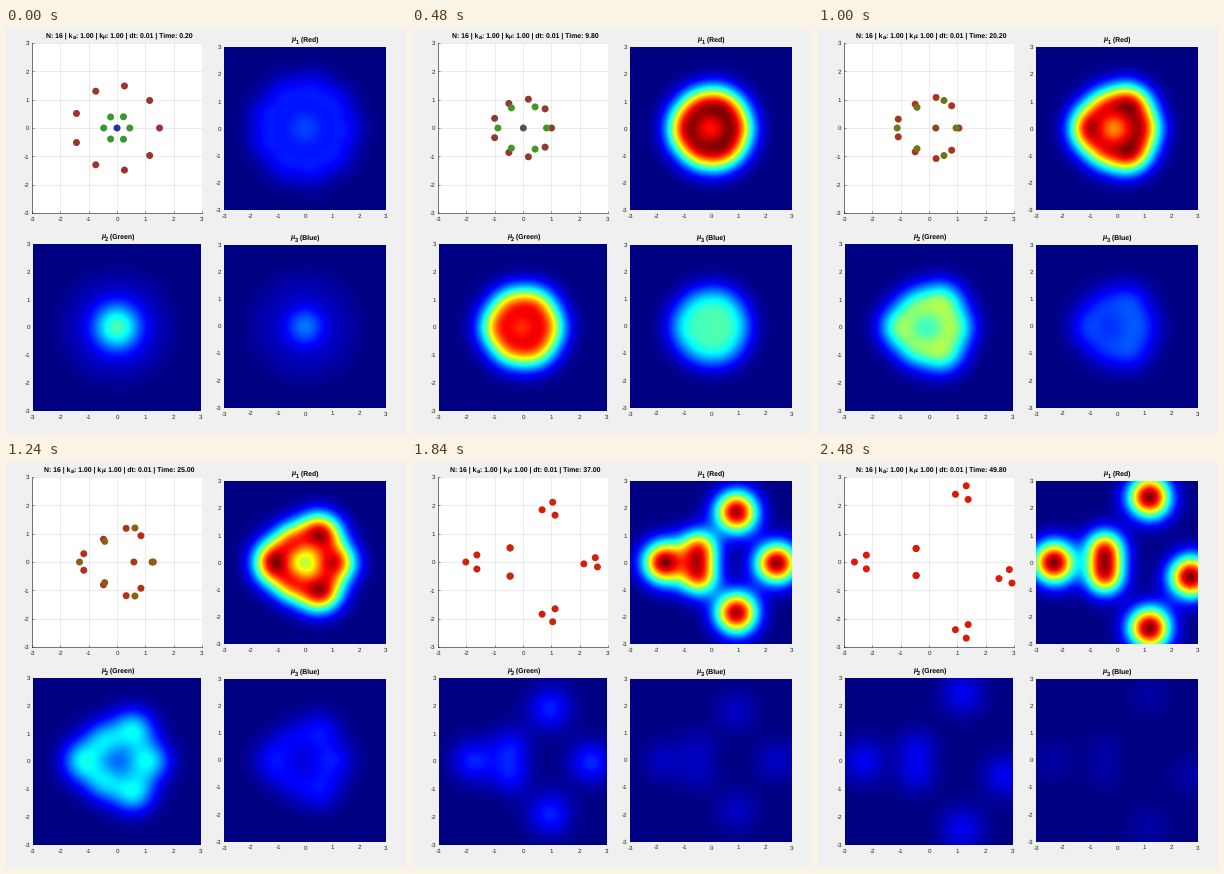
Write a matplotlib script that moves like this. It is 400 px wide and 406 px high and loops after 2.52 s.

```python
import numpy as np
import matplotlib.pyplot as plt
from matplotlib.animation import FuncAnimation
from matplotlib.colors import ListedColormap

W, H, DPI = 400, 406, 64
PT = 72 / DPI                      # points per pixel
FRAMES, INTERVAL = 63, 40
INK = (0.15, 0.15, 0.15)

plt.rcParams.update({"font.family": "Liberation Sans",
                     "text.hinting": "none"})


# --- easing --------------------------------------------------------------
def logistic(i, mid, rate):
    return 1 / (1 + np.exp(-rate * (i - mid)))


def smooth(i, start, end):
    u = np.clip((i - start) / (end - start), 0, 1)
    return u * u * (3 - 2 * u)


def settle(i, start, end):
    """Fast decay from the starting value to the resting one."""
    return end + (start - end) * np.exp(-0.9 * i)


def around(radius, degrees):
    a = np.radians(degrees)
    return np.column_stack([radius * np.cos(a), radius * np.sin(a)])


# --- particles -----------------------------------------------------------
# 0-8: outer ring, 9-14: inner ring, 15: centre
GROUP = np.repeat([0, 1, 2], [9, 6, 1])
LEFT, RIGHT = [9 + 3, 5, 4], [9, 0, 15]
TOP, BOTTOM = [10, 1, 2], [14, 8, 7]

# members, turn, radius, drift, drift midpoint, drift rate, sideways opening
CLUSTERS = [
    (LEFT, (180, -60, 60), 0.28, (-1.8, 0), 47, 0.095, 10),
    (TOP, (68, -52, 188), 0.28, (0.82, 1.78), 42.5, 0.13, 10),
    (BOTTOM, (-68, 52, -188), 0.28, (0.82, -1.78), 42.5, 0.13, 10),
    (RIGHT, (-49, 71, 191), 0.28, (2.15, 0), 37.6, 0.21, 36),
    ([11, 3], (0, 0), 0, (0, -0.31), 38.3, 0.35, 10),
    ([13, 6], (0, 0), 0, (0, 0.31), 38.3, 0.35, 10),
]

# (green, blue) shares of outer, inner, centre; red is the rest
START = np.array([(.20, .18), (.60, .18), (.20, .65)])
REST = np.array([(.22, .27), (.60, .18), (.31, .40)])


def positions(i):
    """Two rings break up into clusters that drift apart."""
    pos = np.concatenate([
        around(settle(i, 1.5, 1.0), np.arange(9) * 40),
        around(settle(i, 0.45, 0.82), np.arange(6) * 60),
        np.zeros((1, 2))])
    for members, turn, radius, drift, mid, rate, opening in CLUSTERS:
        middle = pos[members].mean(axis=0)
        offset = pos[members] - middle
        blend = np.array([smooth(i, 10, 52), smooth(i, opening, 52)])
        offset += (around(radius, turn) - offset) * blend
        pos[members] = middle + offset + np.array(drift) * logistic(i, mid, rate)
    pos[RIGHT, 1] -= 0.62 * logistic(i, 56, 0.3)
    return pos


def shares(i):
    """Neighbours mix, then green and blue fade in favour of red."""
    gb = settle(i, START, REST)[GROUP]
    gb += (gb.mean(axis=0) - gb) * smooth(i, 10, 65)
    green = gb[:, 0] * (1 - 0.75 * logistic(i, 34, 0.15))
    blue = gb[:, 1] * np.exp(-0.037 * max(i - 5, 0))
    return np.column_stack([1 - green - blue, green, blue])


# --- concentration fields ------------------------------------------------
GRID = np.linspace(-3, 3, 151)


def fields(pos, mix, time):
    gx = np.exp(-2 * (GRID - pos[:, :1]) ** 2)
    gy = np.exp(-2 * (GRID - pos[:, 1:]) ** 2)
    maps = [(gy * mix[:, k:k + 1]).T @ gx for k in range(3)]
    gain = 1 - 0.55 * np.exp(-1.5 * (time - 0.2))
    top = max(f.max() for f in maps)
    return [f * gain / top for f in maps]


def jet(n=256):
    x = np.arange(1, n + 1) / n
    ramps = [np.clip(1.5 - np.abs(4 * x - c), 0, 1) for c in (3, 2, 1)]
    return ListedColormap(np.column_stack(ramps))


# --- stage ---------------------------------------------------------------
fig = plt.figure(figsize=(W / DPI, H / DPI), dpi=DPI,
                 facecolor=(240 / 255,) * 3)


def panel(x, y, w, h, lines=False):
    ax = fig.add_axes([x / W, 1 - (y + h) / H, w / W, h / H])
    ticks = range(-3, 4)
    ax.set(xlim=(-3, 3), ylim=(-3, 3))
    ax.set_xticks(ticks, [str(v) for v in ticks])
    ax.set_yticks(ticks, [str(v) for v in ticks])
    ax.tick_params(direction="in", length=1.7 * PT * lines, width=0.5 * PT,
                   color=INK, labelcolor=INK, labelsize=6.2 * PT)
    ax.tick_params(axis="x", pad=3.6 * PT)
    ax.tick_params(axis="y", pad=2.8 * PT)
    for side, spine in ax.spines.items():
        spine.set_visible(lines and side in ("left", "bottom"))
        spine.set(linewidth=0.6 * PT, color=INK)
    return ax


def heading(ax, x, y, parts):
    """Chain text parts along a baseline; a leading _ marks a subscript."""
    made = []
    for part in parts:
        sub = part.startswith("_")
        text = part.lstrip("_")
        style = dict(va="baseline", fontweight="bold",
                     fontsize=(5.6 if sub else 6.85) * PT)
        if text == "μ":
            style.update(family="Liberation Serif", style="italic",
                         fontsize=(6.4 if sub else 7.6) * PT)
        level = 1 - (y + 2.2 * sub) / H
        if made:
            made.append(ax.annotate(
                text, (1, level), xycoords=(made[-1], "figure fraction"),
                annotation_clip=False, **style))
        else:
            made.append(fig.text(x / W, level, text, **style))
    return made


plot = panel(26, 15, 170, 170, lines=True)
plot.set_axisbelow(True)
plot.grid(color=(0.87, 0.87, 0.87), linewidth=0.6 * PT)
dots = plot.scatter(np.zeros(16), np.zeros(16), s=(7 * PT) ** 2,
                    linewidths=0, zorder=3, clip_on=False)
head = heading(plot, 40, 9, ["N: 16 | k", "_a", ": 1.00 | k", "_μ",
                             ": 1.00 | dt: 0.01 | Time: 0.20"])

JET = jet()
images = []
for k, (name, box, left, base) in enumerate([
        ("Red", (218, 19, 162, 163), 285.5, 13.3),
        ("Green", (27, 215.5, 168, 167.5), 95, 210.3),
        ("Blue", (218, 216.5, 162, 163), 284.5, 211.3)]):
    ax = panel(*box)
    images.append(ax.imshow(np.zeros((151, 151)), cmap=JET, vmin=0, vmax=1,
                            origin="lower", extent=(-3, 3, -3, 3),
                            aspect="auto", interpolation="bilinear"))
    heading(ax, left, base, ["μ", f"_{k + 1}", f" ({name})"])


def update(i):
    time = 0.2 + 0.8 * i
    pos, mix = positions(i), shares(i)
    dots.set_offsets(pos)
    dots.set_facecolor(mix)
    for image, field in zip(images, fields(pos, mix, time)):
        image.set_data(field)
    clock = f"{time:.2f}"
    head[-1].set_text(f": 1.00 | dt: 0.01 | Time: {clock}")
    head[0].set_x((40 - 1.9 * (len(clock) - 4)) / W)   # stays centred
    return [dots, *head, *images]


anim = FuncAnimation(fig, update, frames=FRAMES, interval=INTERVAL,
                     init_func=lambda: update(0), repeat=True,
                     repeat_delay=0, blit=False)
plt.show()
```
